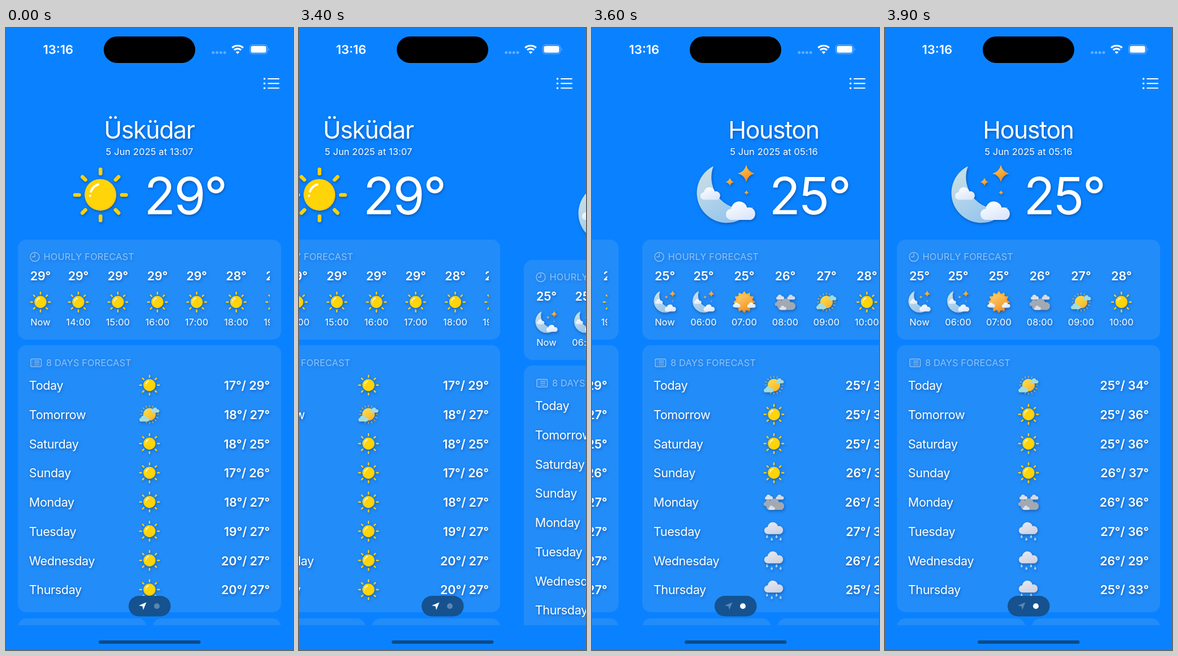
Recreate the animation shown at these times as an HTML page. Size 508 px wide and 1102 px high, loop 5.2 s.

```html
<!DOCTYPE html>
<html lang="en">
<head>
<meta charset="utf-8">
<title>Weather</title>
<style>
  html, body { margin: 0; width: 100%; height: 100%; overflow: hidden; background: #0a82ff; }
  svg { display: block; width: 100vw; height: 100vh; font-family: Inter, "Liberation Sans", sans-serif; fill: #fff; }
  .content { filter: drop-shadow(1px 2px 2.5px rgba(0, 20, 60, .38)); }
  .city { font-size: 42.8px; letter-spacing: -.032em; }
  .small { font-size: 16.4px; letter-spacing: .008em; }
  .row { font-size: 21.6px; letter-spacing: -.018em; }
  .bold { font-size: 21.5px; font-weight: 600; letter-spacing: -.004em; }
  .clock { font-size: 22px; font-weight: 600; }
  .big { font-size: 91px; letter-spacing: -.03em; }
  .mid { text-anchor: middle; }
  .end { text-anchor: end; }
  .line { fill: none; stroke: #fff; stroke-linecap: round; stroke-linejoin: round; }
</style>
</head>
<body>
<svg id="stage" viewBox="0 0 508 1102" preserveAspectRatio="none"></svg>
<script>
const text = (x, y, cls, s) => `<text x="${x}" y="${y}" class="${cls}">${s}</text>`;
const path = (d, fill, attrs = '') => `<path d="${d}" fill="${fill}" ${attrs}/>`;
const circle = (x, y, r, fill) => `<circle cx="${x}" cy="${y}" r="${r}" fill="${fill}"/>`;
const rect = (x, y, w, h, r, fill, attrs = '') =>
  `<rect x="${x}" y="${y}" width="${w}" height="${h}" rx="${r}" fill="${fill}" ${attrs}/>`;
const group = (x, y, scale, inner) =>
  `<g transform="translate(${x} ${y}) scale(${scale})">${inner}</g>`;
const gradient = (id, from, to) =>
  `<linearGradient id="${id}" x2=".6" y2="1"><stop stop-color="${from}"/><stop offset="1" stop-color="${to}"/></linearGradient>`;
const icon = (name, x, y, scale = .38) =>
  `<use href="#${name}" transform="translate(${x} ${y}) scale(${scale})"/>`;

const cloud = (x, y, scale, fill) => group(x, y, scale,
  path('M10 35a9.5 9.5 0 0 1-1-19a13.7 13.7 0 0 1 27-2a10.5 10.5 0 0 1 6 21z', fill));
const star = (x, y, r) => group(x, y, r,
  path('M0-1Q.2-.2 1 0Q.2 .2 0 1Q-.2 .2-1 0Q-.2-.2 0-1z', 'url(#amber)'));
const drop = (x, y) => path(`M${x} ${y}q10 15 0 15q-10 0 0-15z`, '#a5d3f5');

function rays(count, from, to, width, color) {
  let d = '';
  for (let i = 0; i < count; i++) {
    const a = i * 2 * Math.PI / count, c = Math.cos(a), s = Math.sin(a);
    d += `M${c * from} ${s * from}L${c * to} ${s * to}`;
  }
  return path(d, 'none', `stroke="${color}" stroke-width="${width}" stroke-linecap="round"`);
}

function spikes(count, inner, outer) {
  const points = [];
  for (let i = 0; i < count * 2; i++) {
    const a = i * Math.PI / count, r = i % 2 ? inner : outer;
    points.push(`${Math.cos(a) * r} ${Math.sin(a) * r}`);
  }
  return path(`M${points.join('L')}z`, 'url(#amber)');
}

const icons = {
  sun: rays(8, 37.8, 45.2, 6.6, '#ffd10a') + circle(0, 0, 28, '#f9c70a') + circle(-1, -1, 27, '#ffd408') +
    path('M-17-6A20 20 0 0 1-4-18.5', 'none', 'stroke="#fff" stroke-width="4" stroke-linecap="round"') +
    circle(-18.5, 1.5, 2, '#fff'),
  hazy: rays(16, 35, 43, 3, '#f3b53a') + circle(0, 0, 29, 'url(#gold)') +
    cloud(9, -34, .74, '#a2dcdc') + cloud(-47, 2, .9, '#a2dcdc'),
  moon: path('M-22-51A53 53 0 1 0 48 22A56 56 0 0 1-22-51z', 'url(#lunar)') +
    star(36, -38, 15) + star(7, -23, 7.5) + star(36.5, -4, 4) +
    cloud(-45, -16, .7, 'url(#mist)') + cloud(0, 8, 1.04, 'url(#mist)'),
  dawn: spikes(12, 39, 51) + circle(0, 0, 35, 'url(#peach)') +
    cloud(-53, 0, .7, 'url(#mist)') + cloud(14, -1, .78, 'url(#mist)'),
  cloudy: cloud(-42, -37, .74, '#dce1ea') + cloud(9, -37, .74, '#d5dae4') +
    cloud(-48, -14, .95, '#a3a9b3') + cloud(-36, -22, 1.68, '#a3a9b3') + cloud(-26, 15, .62, '#dce1ea'),
  rain: cloud(-45, -48, 1.76, 'url(#vapor)') +
    drop(-32, 17) + drop(-10, 29) + drop(12, 17) + drop(31, 28)
};

const defs = `<defs>
  ${gradient('amber', '#ffd057', '#ee8a1d')}${gradient('gold', '#ffe14a', '#fbb72c')}
  ${gradient('peach', '#ffd06a', '#f39a2e')}${gradient('vapor', '#e9ebf4', '#ced3e2')}
  ${gradient('lunar', '#cfe3e4', '#94c4ee')}${gradient('mist', '#ffffff', '#dce7fb')}
  <clipPath id="view"><rect width="508" height="1058"/></clipPath>
  <clipPath id="strip"><rect x="41" y="420" width="426" height="120"/></clipPath>
  ${Object.entries(icons).map(([name, art]) => `<g id="${name}">${art}</g>`).join('')}
</defs>`;

const dayNames = ['Today', 'Tomorrow', 'Saturday', 'Sunday', 'Monday', 'Tuesday', 'Wednesday', 'Thursday'];
const card = (x, y, w, h) => rect(x, y, w, h, 15, '#228cf9');
const cards = card(21, 375, 466, 177) + card(21, 562, 466, 473) +
  card(21, 1046, 227.5, 60) + card(260, 1046, 227, 60);

const headings = `<g opacity=".5">
  <path class="line" stroke-width="1.4" d="M59 405.5a8 8 0 1 1-16 0a8 8 0 1 1 16 0M51 400v5.5h-4.5"/>
  ${text(66.5, 411.4, 'small', 'HOURLY FORECAST')}
  ${rect(44, 586.5, 18.5, 13.5, 2, 'none', 'class="line" stroke-width="1.4"')}
  <path class="line" stroke-width="1.4" d="M50.5 590h8.5M50.5 593.3h8.5M50.5 596.6h8.5M47.3 590h.1M47.3 593.3h.1M47.3 596.6h.1"/>
  ${text(71, 599.2, 'small', '8 DAYS FORECAST')}
</g>`;

function page(p) {
  const hours = p.hours.map(([x, label, temp, art]) =>
    text(x, 447.3, 'bold mid', temp + '°') + icon(art, x, 485.5) + text(x, 527, 'small mid', label)).join('');
  const days = p.days.map(([art, low, high], i) => {
    const y = 633.2 + i * 51.75;
    return text(40.8, y + 8, 'row', dayNames[i]) + icon(art, 254, y - .4) +
      text(467, y + 8, 'bold end', `${low}°/ ${high}°`);
  }).join('');
  return `<g id="${p.id}">${cards}<g class="content">
    ${text(253.5, 196.3, 'city mid', p.city)}${text(254, 225.3, 'small mid', p.date)}
    ${icon(p.art, p.artX, 295.7, 1)}${text(317, 329.5, 'big mid', p.temp + '°')}
    ${headings}<g clip-path="url(#strip)">${hours}</g>${days}</g></g>`;
}

const first = page({
  id: 'first', city: 'Üsküdar', date: '5 Jun 2025 at 13:07', temp: 29, art: 'sun', artX: 167.3,
  hours: [[61, 'Now', 29, 'sun'], [128, '14:00', 29, 'sun'], [198, '15:00', 29, 'sun'],
    [268, '16:00', 29, 'sun'], [337.5, '17:00', 29, 'sun'], [407.5, '18:00', 28, 'sun'], [477.5, '19:00', 27, 'sun']],
  days: [['sun', 17, 29], ['hazy', 18, 27], ['sun', 18, 25], ['sun', 17, 26],
    ['sun', 18, 27], ['sun', 19, 27], ['sun', 20, 27], ['sun', 20, 27]]
});
const second = page({
  id: 'second', city: 'Houston', date: '5 Jun 2025 at 05:16', temp: 25, art: 'moon', artX: 169,
  hours: [[61, 'Now', 25, 'moon'], [129.5, '06:00', 25, 'moon'], [201.5, '07:00', 25, 'dawn'],
    [274, '08:00', 26, 'cloudy'], [347, '09:00', 27, 'hazy'], [418.5, '10:00', 28, 'sun']],
  days: [['hazy', 25, 34], ['sun', 25, 36], ['sun', 25, 36], ['sun', 26, 37],
    ['cloudy', 26, 36], ['rain', 27, 36], ['rain', 26, 29], ['rain', 25, 33]]
});

const statusBar = rect(173, 15, 162, 47, 23.5, '#000') + text(92.3, 46, 'clock mid', '13:16') +
  `<g opacity=".35">${[366.7, 373.5, 380.3, 387.1].map(x => circle(x, 43.5, 2.5, '#fff')).join('')}
    ${rect(431.5, 29.7, 31, 16, 5, 'none', 'stroke="#fff" stroke-width="1.3"')}
    ${path('M464.3 35.2q3.2 2.5 0 5z', '#fff')}</g>` +
  rect(433.5, 31.7, 27, 12, 3.3, '#fff') +
  path('M400.3 35a14.4 14.4 0 0 1 19.4 0M403.9 39a9 9 0 0 1 12.2 0', 'none', 'stroke="#fff" stroke-width="3.2"') +
  path('M410 46l-3.3-3.5a4.7 4.7 0 0 1 6.6 0z', '#fff');

const menu = '<path class="line" stroke-width="2" d="M464 90h19M464 98.3h19M464 106.6h19"/>' +
  [90, 98.3, 106.6].map(y => circle(457.5, y, 1.8, '#fff')).join('');

const pager = rect(217, 1006, 74.5, 36.5, 18.25, '#15528f') +
  '<path id="arrow" d="M248.5 1017.5L243 1031l-1.5-6.5l-6.5-1.3z"/>' +
  '<circle id="dot" cx="267" cy="1024.3" r="5"/>';

const $ = id => document.getElementById(id);
$('stage').innerHTML = defs + '<rect width="508" height="1102" fill="#0a82ff"/>' +
  `<g clip-path="url(#view)">${first}${second}</g>` +
  statusBar + menu + pager + rect(164, 1085, 180.5, 6, 3, '#104a87');

// Swipe distance, held for 100 ms per step from 3200 ms on
const swipe = [0, 34, 75, 131, 248, 440, 493.5, 505, 508];

function draw(now) {
  const t = now % 5200;
  const step = Math.max(0, Math.min(8, Math.floor(t / 100) - 31));
  const x = swipe[step];
  const lag = step < 4 ? 36 : 0; // the incoming page sits lower until it snaps
  const turned = x > 254;
  $('first').setAttribute('transform', `translate(${-x} 0)`);
  $('second').setAttribute('transform', `translate(${508 - x} ${lag})`);
  $('arrow').setAttribute('opacity', turned ? .3 : 1);
  $('dot').setAttribute('opacity', turned ? 1 : .3);
}

function tick() {
  draw(performance.now());
  requestAnimationFrame(tick);
}
tick();
</script>
</body>
</html>
```
